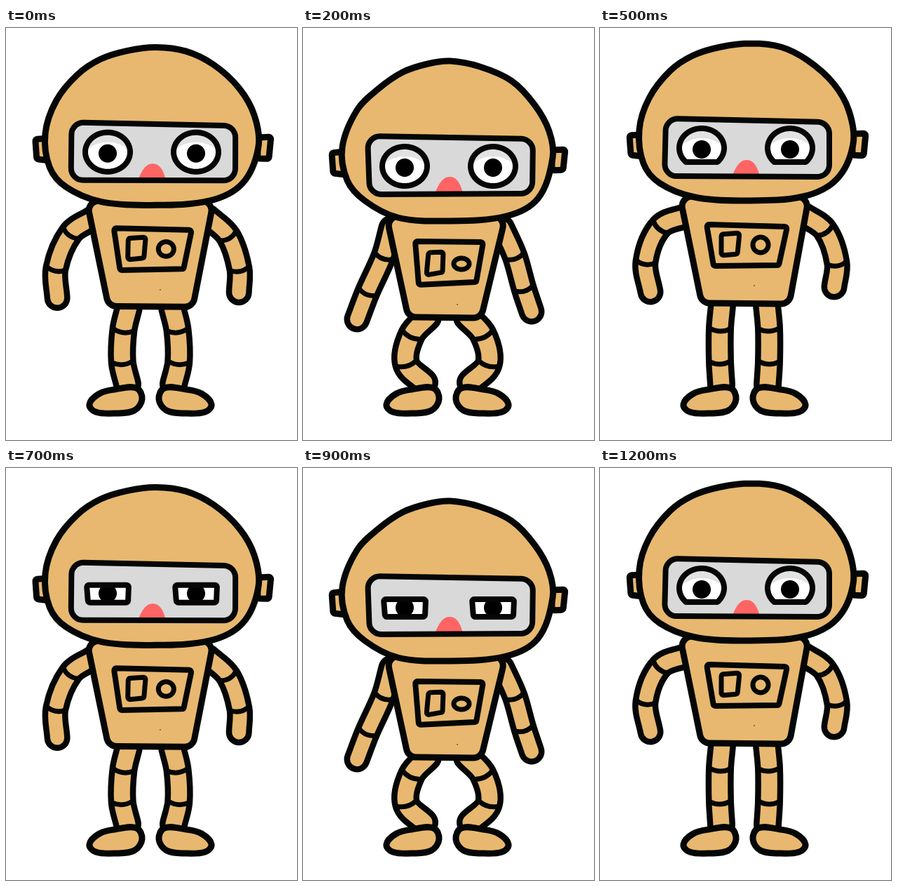
Write an HTML page with a canvas that moves like this. It is 415 px wide and 587 px high and loops after 1.4 s.

```html
<!DOCTYPE html>
<html lang="en">
<head>
<meta charset="utf-8">
<title>Bouncing robot</title>
<style>
  html, body { margin: 0; width: 100%; height: 100%; overflow: hidden; background: #fff; }
  canvas { display: block; width: 415px; height: 587px; }
</style>
</head>
<body>
<canvas id="stage"></canvas>
<script>
const TAN = '#e8b870', VISOR = '#d9d9d9', LID = '#e2e2e2', NOSE = '#ff6464', INK = '#050706';
const AXIS = 206;

// Each part: key points standing tall, then in a full squat.
const HEAD = [
  '215,22 172,27 133,39 100,61 70,100 56,145 62,193 85,221 135,241 205,246 290,240 338,215 361,165 355,118 333,79 296,46 258,27',
  '210,47 178,51 142,63 107,87 77,117 56,170 63,217 88,246 135,270 205,275 290,268 335,243 356,185 351,147 330,109 297,75 252,55'
];
const EARS = [
  ['60,152 42,153 44,181 60,183', '58,176 41,178 43,207 60,209'],
  ['360,151 379,150 376,182 360,181', '355,174 374,173 371,202 355,203']
];
const FACE = ['94,129 327,134 327,212 92,211', '92,154 328,158 327,236 95,237'];
const BODY = ['114,240 145,392 270,393 298,240', '119,268 150,412 254,413 289,268'];
const PANEL = ['152,280 267,283 255,338 162,339', '160,304 257,305 247,362 165,366'];
const SQUARE = ['173,294 199,292 196,322 173,324', '179,320 200,319 199,348 176,352'];
const ARMS = [
  ['122,268 86,283 65,333 72,376', '126,285 115,325 92,376 77,415'],
  ['290,266 321,288 338,335 334,369', '284,285 302,325 315,371 326,404']
];
const LEG = ['174,395 171,428 171,475 173,508', '178,412 155,437 147,478 173,505'];
const FOOT = '186,513 155,515 133,521 119,536 128,547 157,549 183,545 194,529';

// start time, squat from 0 to 1, eye style
const STEPS = [
  [0, 0.22, 'round'], [100, 0.6, 'round'], [200, 1, 'round'], [300, 0.6, 'round'], [400, 0.22, 'round'],
  [500, 0, 'smile'],
  [700, 0.22, 'slit'], [800, 0.6, 'slit'], [900, 1, 'slit'], [1000, 0.6, 'slit'], [1100, 0.22, 'slit'],
  [1200, 0, 'smile']
];
const LOOP = 1400;

const canvas = document.getElementById('stage');
const ctx = canvas.getContext('2d');
const ratio = window.devicePixelRatio || 1;
canvas.width = Math.round(415 * ratio);
canvas.height = Math.round(587 * ratio);
ctx.scale(ratio, ratio);
ctx.lineJoin = ctx.lineCap = 'round';

const parse = text => text.split(' ').map(pair => pair.split(',').map(Number));
const mix = (a, b, k) => a + (b - a) * k;
const mirror = pts => pts.map(([x, y]) => [2 * AXIS - x, y]);

function between([tall, low], k) {
  const end = parse(low);
  return parse(tall).map(([x, y], i) => [mix(x, end[i][0], k), mix(y, end[i][1], k)]);
}

// Unit direction from a to b.
function heading(a, b) {
  const len = Math.hypot(b[0] - a[0], b[1] - a[1]) || 1;
  return [(b[0] - a[0]) / len, (b[1] - a[1]) / len];
}

// Smooth curve through all points.
function curve(pts, closed) {
  const n = pts.length, path = new Path2D();
  const at = i => closed ? pts[(i + n) % n] : pts[Math.max(0, Math.min(n - 1, i))];
  path.moveTo(...pts[0]);
  for (let i = 0; i < (closed ? n : n - 1); i++) {
    const a = at(i), b = at(i + 1);
    const u = heading(at(i - 1), b), v = heading(a, at(i + 2));
    const k = Math.hypot(b[0] - a[0], b[1] - a[1]) / 3;
    path.bezierCurveTo(a[0] + u[0] * k, a[1] + u[1] * k, b[0] - v[0] * k, b[1] - v[1] * k, ...b);
  }
  if (closed) path.closePath();
  return path;
}

// Polygon with rounded corners.
function poly(pts, radius = 3) {
  const n = pts.length, path = new Path2D();
  const mid = (a, b) => [(a[0] + b[0]) / 2, (a[1] + b[1]) / 2];
  path.moveTo(...mid(pts[n - 1], pts[0]));
  pts.forEach((p, i) => path.arcTo(...p, ...mid(p, pts[(i + 1) % n]), radius));
  path.closePath();
  return path;
}

// Ellipse, cut flat below `floor`.
function oval(cx, cy, rx, ry, floor = Infinity) {
  const path = new Path2D();
  for (let a = 0; a < Math.PI * 2; a += 0.05) {
    path.lineTo(cx + rx * Math.cos(a), Math.min(floor, cy + ry * Math.sin(a)));
  }
  path.closePath();
  return path;
}

function fill(path, color) {
  ctx.fillStyle = color;
  ctx.fill(path);
}

function ink(path, width = 8, color = INK) {
  ctx.strokeStyle = color;
  ctx.lineWidth = width;
  ctx.stroke(path);
}

function shape(path, width = 9) {
  fill(path, TAN);
  ink(path, width);
}

// A tube along the points, with a curved band at each inner joint.
function limb(pts, width) {
  const path = curve(pts);
  ink(path, width);
  ink(path, width - 17, TAN);
  const half = width / 2 - 5;
  for (let i = 1; i < pts.length - 1; i++) {
    const [x, y] = pts[i], [dx, dy] = heading(pts[i - 1], pts[i + 1]);
    const band = new Path2D();
    band.moveTo(x - dy * half, y + dx * half);
    band.quadraticCurveTo(x + dx * 8, y + dy * 8, x + dy * half, y - dx * half);
    ink(band, 7);
  }
}

function drawNose(y) {
  const path = new Path2D();
  path.moveTo(188, y);
  path.bezierCurveTo(193, y - 13, 199, y - 24, 209, y - 24);
  path.bezierCurveTo(220, y - 24, 225, y - 13, 228, y);
  fill(path, NOSE);
}

function drawEye(x, y, style) {
  const slit = style === 'slit';
  const outline = slit
    ? poly([[x - 30, y - 12], [x + 30, y - 12], [x + 29, y + 13], [x - 28, y + 13]])
    : oval(x, y - 2, 32, 28, style === 'smile' ? y + 18 : Infinity);
  ctx.save();
  ctx.clip(outline);
  fill(outline, slit ? '#fff' : LID);
  fill(oval(x, y + 14, 38, 30), '#fff');
  fill(oval(x, y, 13, 13), '#000');
  ctx.restore();
  ink(outline);
}

function draw(squat, style) {
  ctx.fillStyle = '#fff';
  ctx.fillRect(0, 0, 415, 587);
  const pose = keys => between(keys, squat);

  for (const arm of ARMS) limb(pose(arm), 37);
  for (const side of [pts => pts, mirror]) {
    limb(side(pose(LEG)), 40);
    shape(curve(side(parse(FOOT)), true));
  }

  shape(poly(pose(BODY), 14));
  ink(poly(pose(PANEL)));
  ink(poly(pose(SQUARE)), 7);
  ink(oval(mix(229, 226, squat), mix(309, 336, squat), 11, mix(11, 8, squat)), 7);
  fill(oval(220, mix(367, 394, squat), 0.7, 0.7), INK);

  for (const ear of EARS) shape(poly(pose(ear)));
  shape(curve(pose(HEAD), true));

  const visor = poly(pose(FACE), 17);
  fill(visor, VISOR);
  drawNose(mix(212, 236, squat));
  ink(visor);
  const eyeY = mix(173, 199, squat);
  drawEye(145, eyeY, style);
  drawEye(271, eyeY, style);
}

const start = performance.now();
let shown = null;

function tick() {
  const time = (performance.now() - start) % LOOP;
  const step = STEPS.findLast(([from]) => from <= time);
  if (step !== shown) {
    draw(step[1], step[2]);
    shown = step;
  }
  requestAnimationFrame(tick);
}
tick();
</script>
</body>
</html>
```
